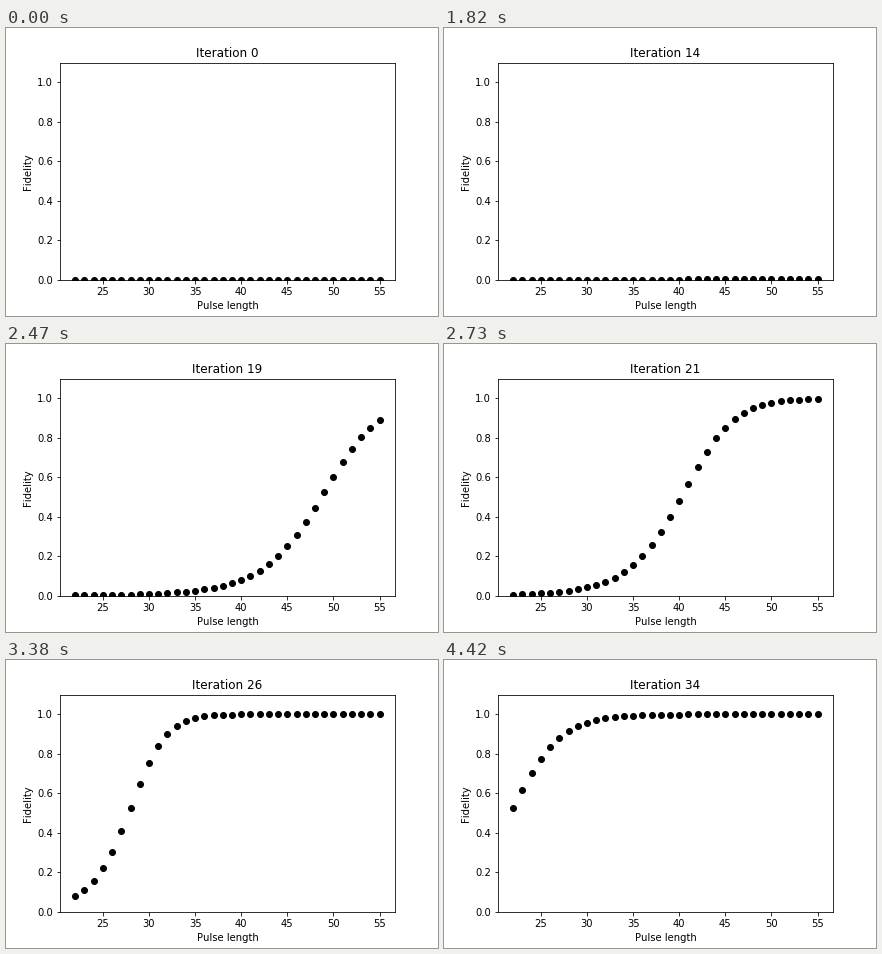
Animation, 432 px wide and 288 px high, one loop 5720 ms. Source, as a matplotlib script:

```python
import numpy as np
import matplotlib.pyplot as plt
from matplotlib.animation import FuncAnimation

FRAME_MS = 130
LAST_ITERATION = 34
HOLD_FRAMES = 9

plt.rcParams["text.kerning_factor"] = 6  # whole-pixel letter spacing

lengths = np.arange(22, 56)


def ease(iteration, start, end):
    """Smoothstep from 0 to 1 between two iterations."""
    u = np.clip((iteration - start) / (end - start), 0, 1)
    return u * u * (3 - 2 * u)


def fidelity(iteration):
    """Logistic curve whose log-odds are quadratic in the pulse length."""
    x = lengths - lengths[0]
    offset = -6.4 + 6.5 * ease(iteration, 15.2, LAST_ITERATION)
    slope = 0.38 * ease(iteration, 13.7, 28)
    bend = np.interp(iteration, [12, 17, 21, 26, 30],
                     [0, 0.0031, 0.0041, 0.0105, 0])
    return 1 / (1 + np.exp(-(offset + slope * x + bend * x ** 2)))


fig, ax = plt.subplots(figsize=(6, 4), dpi=72)
fig.subplots_adjust(left=0.125, right=0.9, bottom=0.125, top=0.88)
dots, = ax.plot(lengths, fidelity(0), "ko")
ax.set_ylim(0, 1.1)
ax.set_xlabel("Pulse length")
ax.set_ylabel("Fidelity")
title = ax.set_title("Iteration 0")


def update(frame):
    iteration = min(frame, LAST_ITERATION)
    dots.set_ydata(fidelity(iteration))
    title.set_text(f"Iteration {iteration}")
    return dots, title


anim = FuncAnimation(fig, update, frames=LAST_ITERATION + 1 + HOLD_FRAMES,
                     interval=FRAME_MS, repeat=True, repeat_delay=0)
plt.show()
```
